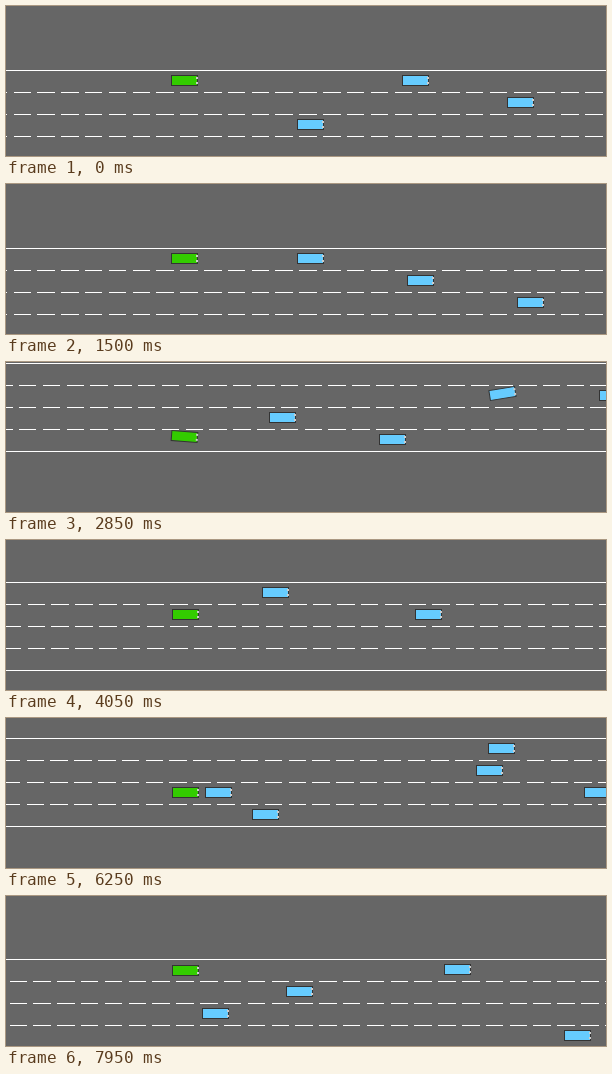
Recreate the animation shown at these times as an HTML page with a canvas. Size 600 by 150 pixels, loop 8000 ms.

```html
<!DOCTYPE html>
<html lang="en">
<head>
<meta charset="utf-8">
<title>Highway driving</title>
<style>
  html, body { margin: 0; width: 100%; height: 100%; overflow: hidden; background: #666; }
  canvas { display: block; width: 600px; height: 150px; }
</style>
</head>
<body>
<canvas id="road" width="600" height="150"></canvas>
<script>
const ctx = document.getElementById('road').getContext('2d');
const STEP = 50, STEPS = 160, DECISION = 5;
const LANE = 22, DASH = 16.5, PITCH = 23.815, PHASE = 8;
const FIRST_CAR = 304, GAP = 110, DRIFT = -5.6, SPEED = 27.5;

// A plan is the starting lane, then the lane chosen at each decision.
// Cars start evenly spaced ahead; drift is their motion relative to the ego car.
const runs = [
  { start: 0, plan: '012332', cars: ['2', '0', '1', '3', '0'], gap: 105 },
  { start: 30, plan: '0012', cars: ['0', '1', '2', '3'] },
  { start: 52, plan: '23', cars: ['2', '3', '110', '1'] },
  { start: 68, plan: '221123', cars: ['0', '1', '2'], speed: 20.9, drift: [-2.7, 0.6, 8] },
  { start: 97, plan: '3', cars: ['2', '3', '2', '1'], speed: 25.06, drift: [-5.7, -5.7, -1.3] },
  { start: 108, plan: '2', cars: ['2', '3', '1', '0', '2'], speed: 30.05,
    drift: [-5.4, -9.1, -2.4, -8.2, -9] },
  { start: 127, plan: '2223', cars: ['1', '2', '0', '3'] },
  { start: 142, plan: '1110', cars: ['2', '1', '0', '3'], speed: 26.85,
    drift: [-5.6, -7.1, -4.3, -3.7] }
];

// Steering response: damped second-order step, value and slope after n steps.
const DAMP = 0.5, FREQ = 0.2887;
function steer(n) {
  if (n <= 0) return [0, 0];
  const decay = Math.exp(-DAMP * n), sin = Math.sin(FREQ * n);
  return [
    1 - decay * (Math.cos(FREQ * n) + DAMP / FREQ * sin),
    (DAMP * DAMP + FREQ * FREQ) / FREQ * decay * sin
  ];
}

// Lane position and lateral rate n steps into a plan.
function follow(plan, n) {
  let lane = +plan[0], rate = 0;
  for (let i = 1; i < plan.length; i++) {
    const [value, slope] = steer(n - (i - 1) * DECISION);
    const move = plan[i] - plan[i - 1];
    lane += move * value;
    rate += move * slope;
  }
  return { lane, rate };
}

function drawCar(x, y, angle, color) {
  ctx.save();
  ctx.translate(Math.round(x) + 0.5, Math.round(y) + 0.5);
  if (Math.abs(angle) > 0.03) ctx.rotate(angle);
  ctx.fillStyle = color;
  ctx.fillRect(-13, -5, 26, 10);
  ctx.strokeStyle = '#333';
  ctx.strokeRect(-13, -5, 26, 10);
  ctx.fillStyle = '#ccc';
  for (const side of [-3.5, 1.5]) ctx.fillRect(11.5, side, 2, 2);
  ctx.restore();
}

function drawRoad(egoLane, phase) {
  ctx.fillStyle = '#666';
  ctx.fillRect(0, 0, 600, 150);
  ctx.fillStyle = '#fff';
  for (let edge = 0; edge <= 4; edge++) {
    const y = Math.round(64 + LANE * (edge - egoLane));
    if (edge % 4 === 0) ctx.fillRect(0, y, 600, 1);
    else for (let x = phase % PITCH - PITCH; x < 600; x += PITCH) {
      const left = Math.floor(x);
      ctx.fillRect(left, y, Math.floor(x + DASH) + 1 - left, 1);
    }
  }
}

function draw(step) {
  const run = runs.filter(r => r.start <= step).pop();
  const { plan, cars, speed = SPEED, gap = GAP, drift = [] } = run;
  const n = step - run.start;
  const ego = follow(plan, n);
  const tilt = rate => Math.atan2(rate * LANE, speed);

  drawRoad(ego.lane, PHASE - speed * n);
  cars.forEach((carPlan, i) => {
    const car = follow(carPlan, n + 1);
    const x = FIRST_CAR + gap * i + (drift[i] ?? DRIFT) * n;
    drawCar(x, 74 + LANE * (car.lane - ego.lane), tilt(car.rate), '#6cf');
  });
  drawCar(177.5 + 0.1 * n, 74, tilt(ego.rate), '#3c0');
}

const begin = performance.now();
function tick() {
  draw(Math.floor(Math.max(0, performance.now() - begin) / STEP) % STEPS);
  requestAnimationFrame(tick);
}
tick();
</script>
</body>
</html>
```
